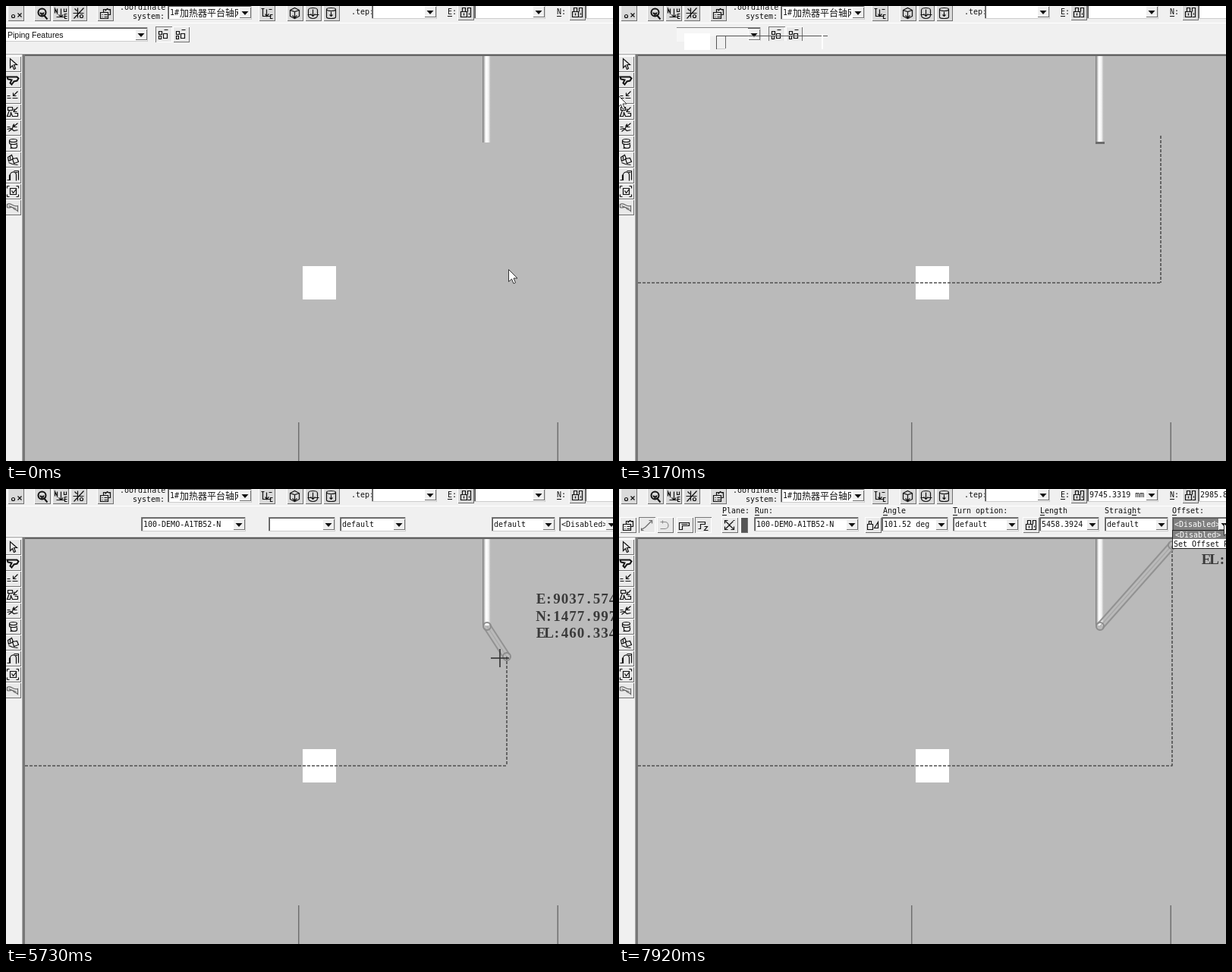
Recreate the animation shown at these times as an HTML page with a canvas. Size 800 by 600 pixels, loop 8 s.

```html
<!DOCTYPE html>
<html lang="en">
<head>
<meta charset="utf-8">
<title>Pipe routing</title>
<style>
html, body { margin: 0; width: 100%; height: 100%; overflow: hidden; background: #bababa; }
canvas { display: block; width: 800px; height: 600px; }
</style>
</head>
<body>
<canvas id="stage" width="800" height="600"></canvas>
<script>
const g = document.getElementById('stage').getContext('2d');
const LOOP = 8000, TICK = 128;
const MONO = '10px "DejaVu Sans Mono", monospace';
const FACE = '#f0f0f0', INK = '#111', DIM = '#8a8a8a';

// Icons are stroked on a 21 px button
const ICON = {
  node: 'M5 14a2 2 0 1 0 4 0a2 2 0 1 0-4 0M13 10l5 5M18 10l-5 5',
  zoom: 'M5 9a5 5 0 1 0 10 0a5 5 0 1 0-10 0M8 9a2 2 0 1 0 4 0M12 12l5 6M10 10v4',
  axes: 'M11 4v11M5 15h11M3 10v-6l3 6v-6M15 4v4h3v-4M19 11h-3v6h3M16 14h3M8 12l3 3 3-3',
  origin: 'M3 10h14M9 3v13M4 17l13-14M12 14a2 2 0 1 0 4 0a2 2 0 1 0-4 0M5 4l3 3',
  sheet: 'M4 9h10v8h-10zM6 12h1M9 12h4M6 15h1M9 15h4M8 9v-4h9v7h-3M10 7l3-3 3 2',
  compass: 'M5 4v10h11M10 5v9M13 5h4M3 4h4M8 11l2 3 3-3M18 12h-3v5h3',
  cube: 'M4 6l6-3 6 3v8l-6 3-6-3zM4 6l6 2 6-2M10 8v8M7 13l3 3 3-3',
  ring: 'M4 6a6 3 0 0 1 12 0M4 6v7a6 4 0 0 0 12 0v-7M10 5v9M7 11l3 3 3-3M3 12h5M13 12h5',
  drum: 'M4 5a6 2 0 1 0 12 0a6 2 0 1 0-12 0v10a6 2 0 0 0 12 0v-10M10 8v6M8 12l2 2 2-2',
  lock: 'M4 9h8v7h-8zM6 9v-5h4v5M8 11v3M13 9v-5h4v12h-4M15 11v2',
  pick: 'M6 3v12l3-3 2 5 2-1-2-5h4z',
  route: 'M2 6h13l2 2-2 3-4 1-3 4-2-2 2-4-5-1z',
  line: 'M2 13h5M9 13h7M2 10h4M10 10l6-6M10 6v4h4',
  valve: 'M3 4h6v4h-6zM5 8l-3 8h4l1-5 2 5h7M10 10l6-6M11 6v4h4M12 12h4v4',
  branch: 'M2 12l5-1 4 3 5-1M4 15l5-4 1-5M10 9l6-5M11 5v4h4M2 9h4',
  coil: 'M5 6a5 2 0 1 0 10 0a5 2 0 1 0-10 0v3a5 2 0 0 0 10 0M7 11v3a4 2 0 0 0 8 0v-3M6 16h8',
  clamp: 'M3 7l5-3 2 5-6 3zM9 9l6-1 2 5-6 2zM4 14l5 2 7 1M6 6v4',
  bend: 'M2 16h4v-6a4 4 0 0 1 8-1v8M5 16v-7M11 4h6v12M13 6h3',
  box: 'M2 3h3M2 3v3M17 3h-3M17 3v3M2 17h3M2 17v-3M17 17h-3M17 17v-3M6 6h8v8h-8zM8 9l2 3 4-5',
  flag: 'M2 6c5-3 8 4 14 2v7c-3-3-4-1-6-4s-5 1-8-1zM4 8l10 4',
  leg: 'M3 16l5-3 3-3 5-5M3 14v3h3M13 4h4v4',
  hook: 'M4 6h6a4 4 0 0 1 0 9h-6M7 4v4M4 15h3',
  elbow: 'M3 7h13v4h-9v5h-4zM6 9h8',
  tee: 'M3 6h10v3h-6v6h-3M12 12h4l-4 5h5',
  plane: 'M5 5l10 10M15 5l-10 10M4 8v-4h4M16 12v4h-4M8 16h-4v-4M15 4h2',
  angle: 'M3 9h7v7h-7zM5 9v-4h3v4M12 14l5-8v8z',
  group: 'M4 6h4v4h-4zM10 9h5v6h-5zM4 12h3v4h-3zM11 4h5'
};

function rect(x, y, w, h, c) { g.fillStyle = c; g.fillRect(x, y, w, h); }

function line(x1, y1, x2, y2, c, w = 1, dash = []) {
  g.strokeStyle = c; g.lineWidth = w; g.setLineDash(dash);
  g.beginPath(); g.moveTo(x1, y1); g.lineTo(x2, y2); g.stroke();
  g.setLineDash([]);
}

function text(s, x, y, c = INK, font = MONO) { g.font = font; g.fillStyle = c; g.fillText(s, x, y); }

function label(s, x, y, mark = 0, c = INK) {
  text(s, x, y, c);
  if (mark >= 0) rect(x + mark * 6, y + 2, 6, 1, c);
}

function clipped(x, y, w, h, draw) {
  g.save(); g.beginPath(); g.rect(x, y, w, h); g.clip(); draw(); g.restore();
}

function bevel(x, y, w, h, face, down) {
  rect(x, y, w, h, down ? '#777' : '#fff');
  rect(x + 1, y + 1, w - 1, h - 1, down ? '#fff' : '#707070');
  rect(x + 1, y + 1, w - 2, h - 2, face);
}

function button(name, x, y, { w = 22, h = 21, face = '#e9e9e9', c = INK, down = false } = {}) {
  bevel(x, y, w, h, face, down);
  g.save();
  g.translate(x + .5, y + .5);
  g.strokeStyle = c; g.lineWidth = name === 'zoom' || name === 'route' ? 2 : 1.2;
  g.stroke(new Path2D(ICON[name]));
  g.restore();
}

function field(x, y, w, s = '', c = INK) {
  rect(x, y, w, 19, '#fff');
  rect(x, y, w, 1, '#808080'); rect(x, y, 1, 19, '#808080');
  rect(x + 1, y + 1, w - 2, 1, '#555'); rect(x + 1, y + 1, 1, 17, '#555');
  rect(x, y + 18, w, 1, '#ccc'); rect(x + w - 1, y, 1, 19, '#ccc');
  clipped(x + 2, y, w - 3, 19, () => text(s, x + 3, y + 13, c));
}

function combo(x, y, w, s, c = INK) {
  field(x, y, w, s, c);
  const bx = x + w - 17, cx = bx + 8, cy = y + 10;
  bevel(bx, y + 2, 16, 15, FACE);
  g.fillStyle = c;
  g.beginPath(); g.moveTo(cx - 4.5, cy - 2); g.lineTo(cx + 4.5, cy - 2); g.lineTo(cx, cy + 3); g.fill();
}

// Linear path through [tick, x, y] stops
function along(stops, k) {
  let i = 0;
  while (i < stops.length - 1 && stops[i + 1][0] <= k) i++;
  const a = stops[i], b = stops[i + 1];
  if (k <= a[0] || !b) return [a[1], a[2]];
  const p = (k - a[0]) / (b[0] - a[0]);
  return [a[1] + (b[1] - a[1]) * p, a[2] + (b[2] - a[2]) * p];
}

const POINTER = [
  [4, 662, 347], [11, 588, 151], [15, 673, 224], [17, 673, 224], [21, 330, 241],
  [22, 330, 242], [25, -2, 117], [29, 75, 128], [30, 17, 96], [33, 17, 96],
  [37, 480, 215], [38, 480, 215], [45, 651, 223], [49, 640, 254], [52, 751, 87], [59, 797, 45]
];
const PIPE_END = [[38, 489, 213], [45, 660, 221], [49, 643, 226], [52, 729, 74]];
const SCALE = 10.257348;
const east = x => (8863.2 + (x - 643) * SCALE).toFixed(4);
const north = y => (1426.7109 + (226 - y) * SCALE).toFixed(4);

function topRow(k) {
  rect(0, 0, 800, 66, FACE);
  rect(0, 22, 800, 1, '#fff');
  const face = '#dadada';
  const at = { node: 2, zoom: 37, axes: 61, origin: 85, sheet: 120, compass: 333, cube: 370, ring: 394, drum: 418 };
  for (const name in at) button(name, at[name], -1, { face });
  text('.oordinate', 150, 5);
  text('system:', 167, 17);
  combo(213, -1, 111, '1#');
  clipped(214, 1, 92, 16, () => text('加热器平台轴网', 229, 14, INK, '12px "Noto Sans CJK SC", "Noto Sans CJK", sans-serif'));
  text('.tep:', 455, 11);
  combo(482, -2, 86, '');
  label('E:', 582, 11);
  label('N:', 726, 11);
  const [x, y] = along(PIPE_END, k), live = k >= 48;
  combo(617, -2, 94, live ? east(x) + ' mm' : '');
  field(763, -2, 60, live ? (k < 50 ? '1457.4012' : north(y)) : '');
  button('lock', 595, -2, { face });
  button('lock', 742, -2, { face });
}

function filterRow(k) {
  combo(-2, 28, 189, '');
  if (k < 21) text('Piping Features', 2, 42, INK, '10.5px "Liberation Sans", Arial, sans-serif');
  button('group', 197, 27, { down: true });
  button('group', 220, 27);
  if (k < 23) return;
  rect(0, 25, 76, 36, FACE);
  rect(76, 29, 94, 18, '#f6f6f6');
  rect(86, 36, 34, 22, '#fff');
  rect(120, 40, 50, 18, FACE);
  rect(170, 46, 105, 3, FACE);
  rect(128, 39, 147, 1, '#555');
  rect(128, 39, 1, 18, '#555');
  rect(140, 40, 1, 16, '#666');
  rect(129, 56, 11, 1, '#ccc');
  rect(267, 37, 2, 20, '#fff');
}

function editRow() {
  button('sheet', 2, 38); button('leg', 26, 38); button('leg', 50, 38);
  button('plane', 86, 38);
  bevel(110, 38, 10, 21, '#555');
  label('Plane:', 86, 33); label('Run:', 129, 33);
  field(128, 38, 139, '100-DEMO-A1TB52-N');
  label('Type:', 275, 33, 0, DIM); combo(275, 38, 116, 'None', DIM);
  label('Option:', 400, 33, 0, DIM); combo(400, 38, 116, 'Default', DIM);
  button('angle', 526, 38);
  label('Angle:', 550, 33, 0, DIM); combo(549, 38, 67, '', DIM);
  button('lock', 625, 38);
  label('Length:', 649, 33); combo(648, 38, 67, '2559.234');
  label('Offset:', 724, 33); combo(724, 38, 68, '<Disabled>');
}

function routeRow(k) {
  const p = Math.min(1, Math.max(0, (k - 49) / 3));
  if (k >= 42) combo(178, 37, 138, '100-DEMO-A1TB52-N');
  if (k >= 43) combo(346, 37, 88, k < 46 ? '' : (85.24 + 16.28 * p).toFixed(2) + ' deg');
  if (k >= 44) combo(440, 37, 87, 'default');
  if (k >= 45) { combo(640, 37, 84, 'default'); combo(729, 37, 78, '<Disabled>'); }
  if (k < 46) return;
  combo(554, 37, 79, (5277.8403 + 180.5521 * p).toFixed(4));
  label('Plane:', 136, 32); label('Run:', 179, 32);
  label('Angle', 348, 32); label('Turn option:', 440, 32);
  label('Length', 555, 32); label('Straight', 640, 32, 6); label('Offset:', 729, 32);
  if (k < 47) return;
  button('sheet', 1, 37); button('leg', 26, 37, { down: true, c: '#666' }); button('hook', 50, 37, { c: DIM });
  button('elbow', 76, 37); button('tee', 100, 37, { down: true });
  button('plane', 135, 37);
  bevel(160, 37, 10, 21, '#555');
  button('angle', 324, 37); button('lock', 532, 37);
}

function sideBar() {
  rect(0, 62, 24, 538, FACE);
  rect(0, 62, 800, 1, '#fff'); rect(0, 63, 800, 1, '#a0a0a0');
  rect(22, 64, 778, 2, '#666');
  rect(21, 64, 1, 536, '#aaa'); rect(22, 64, 3, 536, '#777');
  ['pick', 'route', 'line', 'valve', 'branch', 'coil', 'clamp', 'bend', 'box', 'flag'].forEach((name, i) =>
    button(name, -1, 66 + i * 21, { w: 21, c: name === 'flag' ? '#666' : INK }));
}

function readout(x, y, top) {
  const rows = ['E:' + east(x), 'N:' + north(y), 'EL:460.3349'];
  g.textAlign = 'center';
  rows.forEach((s, r) => [...s].forEach((ch, i) =>
    text(ch, x + 45 + i * 10.5, top + r * 22.5, '#3a3a3a', 'bold 19px "Liberation Serif", serif')));
  g.textAlign = 'left';
}

function newPipe(x, y) {
  const sx = 634, sy = 181, len = Math.hypot(x - sx, y - sy);
  const nx = -(y - sy) / len, ny = (x - sx) / len;
  for (const d of [-4.5, 0, 4.5])
    line(sx + nx * d, sy + ny * d, x + nx * d, y + ny * d, d ? '#929292' : '#a8a8a8', d ? 2 : 1.2);
  g.lineWidth = 2; g.strokeStyle = '#8c8c8c';
  for (const [cx, cy] of [[sx, sy], [x, y]]) {
    g.beginPath(); g.arc(cx, cy, 5, 0, 7); g.stroke();
  }
}

function scene(k) {
  rect(24, 64, 776, 536, '#bababa');
  rect(385, 549, 1.5, 51, '#707070');
  rect(726.5, 549, 1.5, 51, '#707070');
  rect(391, 343, 44, 44, '#fff');

  const shade = g.createLinearGradient(628, 0, 639, 0);
  [['0', '#777'], ['.15', '#a5a5a5'], ['.4', '#fff'], ['.7', '#f4f4f4'], ['1', '#b4b4b4']]
    .forEach(([p, c]) => shade.addColorStop(+p, c));
  rect(628, 66, 11, 114, shade);
  if (k >= 20 && k < 39) rect(628, 179, 12, 3, '#6c6c6c');

  const [x, y] = along(PIPE_END, k);
  if (k >= 20) {
    const [dx, dy] = k < 37 ? [714, 171] : [x, y];
    line(25, 365, dx + .5, 365, '#505050', 1.6, [4, 2]);
    line(dx, dy, dx, 365, '#505050', 1.6, [4, 2]);
  }
  if (k >= 39) {
    newPipe(x, y);
    readout(x, y, Math.max(54, y - 70));
  }
}

function menu() {
  rect(731, 39, 59, 15, '#808080');
  clipped(731, 39, 59, 15, () => text('<Disabled>', 732, 50, '#fff'));
  rect(729, 54, 72, 25, '#222');
  rect(730, 55, 70, 23, '#fff');
  rect(730, 55, 70, 11, '#808080');
  text('<Disabled>', 733, 64, '#fff');
  text('Set Offset Reference', 731, 76);
}

function pointer(k) {
  const [x, y] = along(POINTER, k);
  if ((k >= 12 && k <= 17) || k === 33) {
    g.fillStyle = 'rgba(228,228,228,.68)';
    g.beginPath(); g.arc(x, y, 12, 0, 7); g.fill();
  }
  if (k >= 36 && y > 66) {
    line(x - 12, y, x + 12, y, '#333', 1.6);
    line(x, y - 12, x, y + 12, '#333', 1.6);
    return;
  }
  g.save();
  g.translate(x + .5, y + .5);
  const arrow = new Path2D('M0 0V16L4 12.5L6.5 18.5L9 17.3L6.5 11.5H11.5Z');
  g.fillStyle = '#fff'; g.fill(arrow);
  g.strokeStyle = '#333'; g.lineWidth = 1; g.stroke(arrow);
  g.restore();
}

function draw(k) {
  scene(k);
  topRow(k);
  if (k < 27) filterRow(k);
  else if (k < 35) editRow();
  else routeRow(k);
  sideBar();
  if (k >= 12 && k <= 18) {
    const [x, y] = k > 15 ? [673, 224] : along(POINTER, k);
    g.strokeStyle = '#f0f0f0'; g.lineWidth = 1.5; g.setLineDash([6, 3]);
    g.strokeRect(588, 151, x - 588, y - 151);
    g.setLineDash([]);
  }
  if (k >= 60) menu();
  pointer(k);
}

let shown = -1;
function frame() {
  const k = Math.floor((performance.now() % LOOP + 44) / TICK);
  if (k !== shown) draw(shown = k);
  requestAnimationFrame(frame);
}
frame();
</script>
</body>
</html>
```
